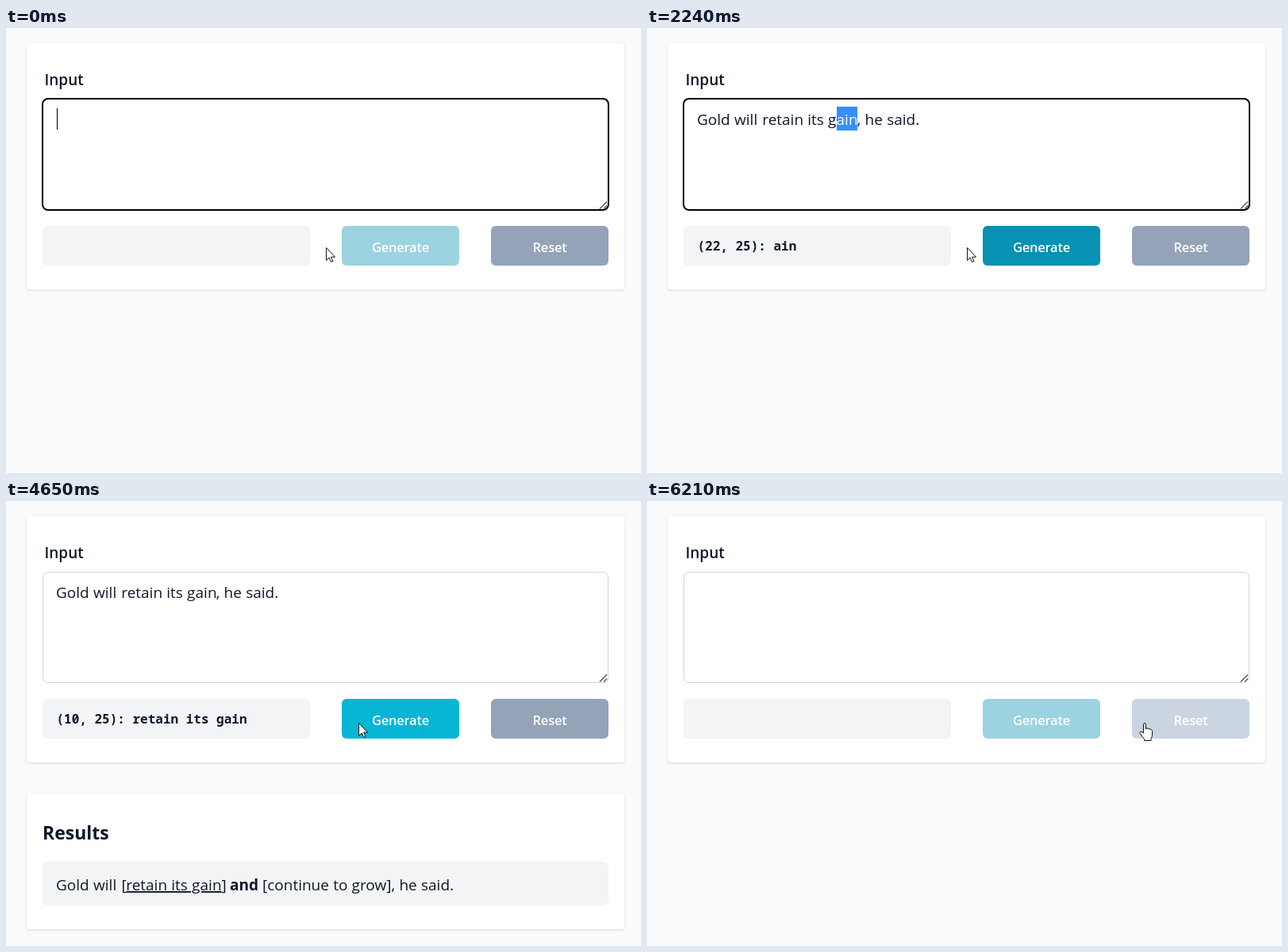
Write an HTML page that moves like this. It is 800x560 px and loops after 6.75 s.

```html
<!DOCTYPE html>
<html lang="en">
<head>
<meta charset="utf-8">
<title>Generate form</title>
<style>
  html, body { margin: 0; width: 100%; height: 100%; overflow: hidden; background: #f8fafc; }
  svg { display: block; fill: #0f172a; }
  text { font: 19px "Open Sans", "Noto Sans", sans-serif; word-spacing: .3px; white-space: pre; }
  .label { font-weight: 600; }
  .title { font-weight: 700; font-size: 23px; }
  .bold { font-weight: 700; }
  .button { font-weight: 600; font-size: 16.5px; letter-spacing: -.25px; fill: #fff; text-anchor: middle; }
  .mono { font: 700 16px "Noto Sans Mono", "DejaVu Sans Mono", monospace; word-spacing: 0; }
  .card { fill: #fff; filter: drop-shadow(0 1px 1.5px rgba(0, 0, 0, .12)); }
  .panel { fill: #f3f4f6; }
  .cursor { fill: #fff; stroke: #111; stroke-linejoin: round; }
</style>
</head>
<body>
<svg width="800" height="560" viewBox="0 0 800 560">
  <defs><clipPath id="clip"><rect id="clipBox" y="99" height="30"/></clipPath></defs>

  <rect class="card" x="26" y="19" width="753" height="310" rx="4"/>
  <text class="label" x="48.5" y="72">Input</text>
  <rect id="field" fill="#fff"/>
  <path d="M748 227.5l9-9M753 227.5l4-4" stroke="#5b4a46" stroke-width="1.3"/>

  <g id="sentence">
    <text x="63" y="122">Gold will </text>
    <text id="phrase" x="145.3" y="122">retain its gain</text>
    <text id="tail" x="264.7" y="122">, he said.</text>
  </g>
  <g id="selection">
    <rect id="highlight" y="99" height="30" fill="#3390ff"/>
    <use href="#phrase" fill="#fff" clip-path="url(#clip)"/>
  </g>
  <rect id="caret" width="1" height="27" fill="#000"/>

  <rect class="panel" x="46" y="249" width="337" height="50" rx="6"/>
  <text id="status" class="mono" x="63.5" y="280"></text>
  <rect id="generate" x="423" y="249" width="148" height="50" rx="6"/>
  <text class="button" x="497" y="282">Generate</text>
  <rect id="reset" x="611" y="249" width="148" height="50" rx="6"/>
  <text class="button" x="685" y="282">Reset</text>

  <g id="results">
    <rect class="card" x="26" y="369" width="753" height="170" rx="4"/>
    <text class="title" x="46" y="426">Results</text>
    <rect class="panel" x="46" y="454" width="713" height="55" rx="6"/>
    <text x="63" y="490">Gold will </text>
    <text x="145.5" y="490">[</text>
    <text x="151.3" y="490" text-decoration="underline">retain its gain</text>
    <text x="271.5" y="490">]</text>
    <text class="bold" x="282" y="490">and</text>
    <text x="323" y="490">[continue to grow], he said.</text>
  </g>

  <path id="arrow" class="cursor" d="M.5 .5V16.5L4.2 13 6.6 18.5 9 17.4 6.6 12.2H11.5z"/>
  <path id="hand" class="cursor" d="M.5 13V2.5Q.5 .5 2 .5T3.5 2.5V8Q3.7 6.7 5 6.7T6.3 8.2Q6.6 7.3 7.8 7.5T9 9Q9.4 8.3 10.3 8.6 11.5 9 11.5 10.5V15Q11.5 18 10 20V22.5H1.5V20.5Q-1 17.5-3.8 13.5-4.7 12-3.5 11.3-2 10.7 .5 13z"/>
</svg>
<script>
const LOOP = 6750;
const PHRASE = "retain its gain";
const PHRASE_START = 10, PHRASE_END = 25;
const CARET_MOVES = [[880, 10], [1150, 9], [1420, 7], [1490, 5], [1560, 3], [1630, 0]];

const el = id => document.getElementById(id);
const set = (id, attrs) => {
  for (const name in attrs) el(id).setAttribute(name, attrs[name]);
};
const show = (id, on) => set(id, { visibility: on ? "visible" : "hidden" });
const within = (t, from, to) => t >= from && t < to;
const charX = (id, i) => {
  const text = el(id);
  return i < text.getNumberOfChars()
    ? text.getStartPositionOfChar(i).x
    : text.getEndPositionOfChar(i - 1).x;
};

function drawField(t) {
  const focused = t < 3590;
  set("field", focused
    ? { x: 46, y: 89, width: 713, height: 140, rx: 7, stroke: "#000", "stroke-width": 2 }
    : { x: 46.5, y: 89.5, width: 712, height: 139, rx: 6, stroke: "#d1d5db", "stroke-width": 1 });
  show("sentence", within(t, 880, 6210));

  const move = CARET_MOVES.filter(([time]) => t >= time).pop();
  show("caret", t < 70 || within(t, 330, 540) || within(t, 810, 1900));
  set("caret", move
    ? { x: Math.round(charX("tail", move[1])), y: 100 }
    : { x: 64, y: 101 });
}

function drawSelection(t) {
  // One character first, then key repeat adds two at a time.
  const repeats = t < 2170 ? 0 : Math.min(7, 1 + Math.floor((t - 2170) / 81.6));
  const start = PHRASE_END - 1 - 2 * repeats;
  const x = Math.round(charX("phrase", start - PHRASE_START) + .3);
  for (const id of ["highlight", "clipBox"]) set(id, { x, width: 265 - x });
  show("selection", within(t, 1900, 3590));
  el("status").textContent = within(t, 1900, 6210)
    ? `(${start}, ${PHRASE_END}): ${PHRASE.slice(start - PHRASE_START)}`
    : "";
}

function drawPointer(t) {
  const step = t < 5320 ? 0 : Math.min(8, 1 + Math.floor((t - 5320) / 70));
  const onForm = t >= 3260;
  const x = onForm ? Math.round(444 + 181 * (1 - (1 - step / 8) ** 1.5)) : 403;
  const y = onForm ? 279 : 276;
  const overGenerate = within(x, 423, 571), overReset = within(x, 611, 759);
  const loading = within(t, 3660, 4650);
  const pointing = (overGenerate || overReset) && !within(t, 4190, 4990);

  set("generate", {
    fill: overGenerate ? "#06b6d4" : "#0891b2",
    "fill-opacity": loading || !within(t, 1900, 6210) ? .4 : 1
  });
  set("reset", { fill: overReset ? "#cbd5e1" : "#94a3b8" });
  show("hand", pointing);
  show("arrow", !pointing);
  for (const id of ["hand", "arrow"]) set(id, { transform: `translate(${x} ${y})` });
}

function draw(now) {
  const t = now % LOOP;
  drawField(t);
  drawSelection(t);
  drawPointer(t);
  show("results", within(t, 4650, 6210));
}

const began = performance.now();
function tick() {
  draw(performance.now() - began);
  requestAnimationFrame(tick);
}
tick();
</script>
</body>
</html>
```
